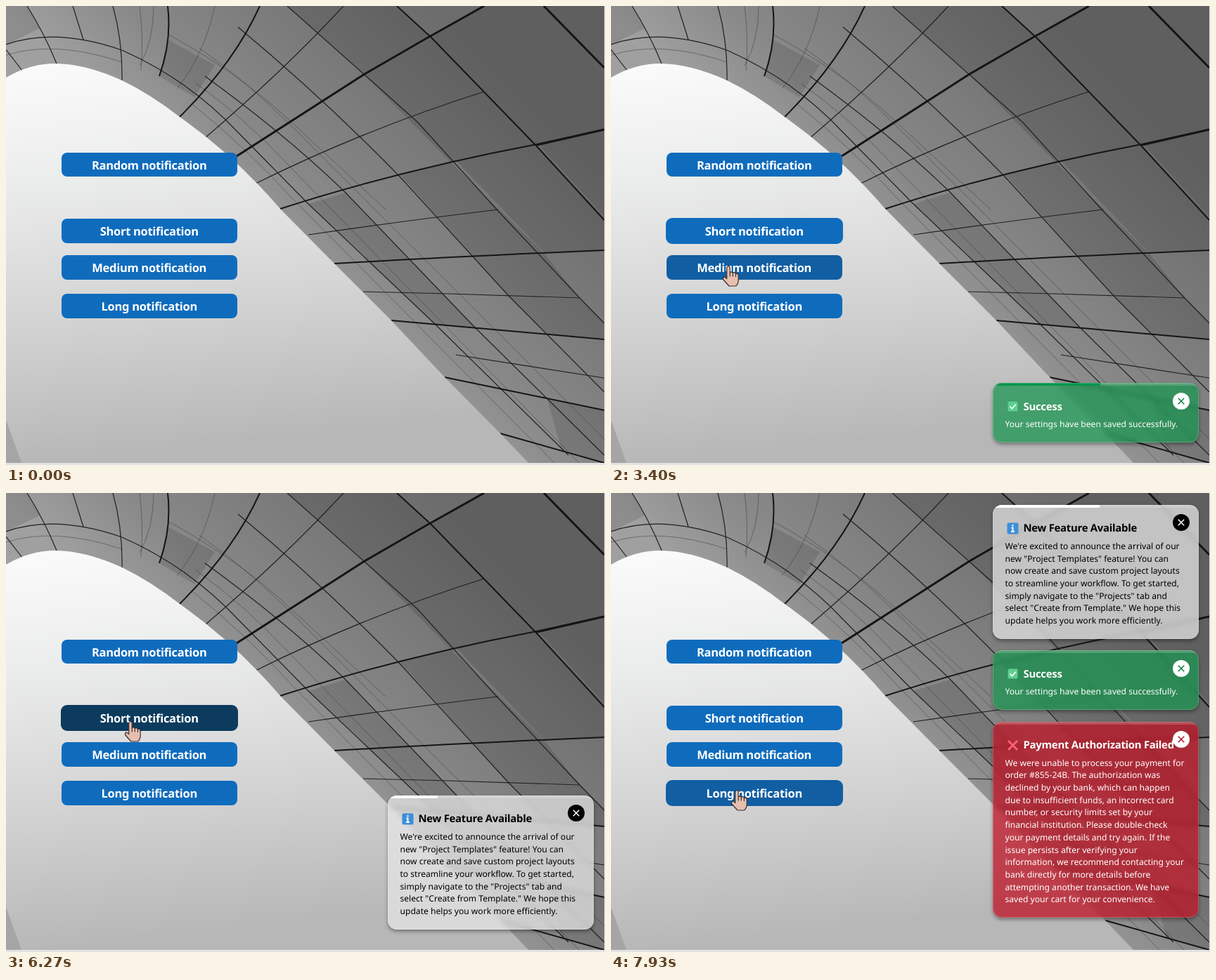
These frames come from a looping animation (852x654 px, 8000 ms). An HTML page:

```html
<!DOCTYPE html>
<html lang="en">
<head>
<meta charset="utf-8">
<title>Notifications</title>
<style>
  html, body { margin: 0; width: 100%; height: 100%; overflow: hidden; }
  #stage {
    position: relative; width: 852px; height: 654px; overflow: hidden; background: #ddd;
    font-family: "Noto Sans", "Open Sans", sans-serif; text-rendering: geometricPrecision;
  }
  #stage > * { position: absolute; left: 0; top: 0; }
  #stage > .button {
    --fill: #0f6cbd;
    left: 78.5px; width: 250.5px; height: 34.4px; line-height: 35px; border-radius: 8px;
    background: var(--fill); color: #fff; text-align: center;
    font-size: 16.5px; font-weight: 600; letter-spacing: -.018em;
  }
  #stage > .hover { --fill: #115ea3; }
  #stage > .pressed { --fill: #0c3b5e; }
  #stage > .focus { box-shadow: 0 0 0 1px var(--fill); }
  #stage > .toast {
    left: 543px; width: 293px; border-radius: 13px; overflow: hidden; color: #fff;
    backdrop-filter: blur(3px); box-shadow: 0 3px 5px rgba(0, 0, 0, .35);
  }
  .toast::after {
    content: ""; position: absolute; inset: 0; border-radius: 13px;
    border: 1px solid rgba(255, 255, 255, .2);
  }
  .toast > * { position: absolute; }
  .success { background: rgba(27, 150, 80, .75); --bar: #05954a; --mark: #0b8043; }
  .error { background: rgba(190, 20, 36, .75); --bar: #b0122a; --mark: #b0122a; }
  #stage > .info { background: rgba(228, 228, 228, .75); color: #000; --bar: #fff; }
  .track { left: 0; top: 0; width: 100%; height: 4px; background: rgba(255, 255, 255, .18); }
  .bar { height: 4px; background: var(--bar); }
  .icon { left: 20px; top: 25px; }
  .title {
    left: 43.5px; top: 23.5px; line-height: 20px; white-space: nowrap;
    font-size: 14.9px; font-weight: 600; letter-spacing: -.018em;
  }
  .text { left: 17.5px; top: 50px; line-height: 17.68px; font-size: 12.1px; white-space: pre; }
  .close { left: 256px; top: 13.5px; }
</style>
</head>
<body>
<div id="stage">
  <svg width="852" height="654" fill="none">
    <defs>
      <linearGradient id="sky" x1="0" y1="82" x2="60" y2="651" gradientUnits="userSpaceOnUse">
        <stop offset="0" stop-color="#fbfbfb"/><stop offset=".3" stop-color="#ebecec"/>
        <stop offset=".65" stop-color="#d3d3d3"/><stop offset="1" stop-color="#b7b7b7"/>
      </linearGradient>
      <linearGradient id="wall" x1="380" y1="390" x2="690" y2="80" gradientUnits="userSpaceOnUse">
        <stop offset="0" stop-color="#a0a0a0"/><stop offset=".3" stop-color="#888"/>
        <stop offset=".7" stop-color="#777"/><stop offset="1" stop-color="#6c6c6c"/>
      </linearGradient>
    </defs>
    <path fill="url(#wall)" d="M0 0H851V651H0Z"/>
    <g fill="#000" fill-opacity=".12">
      <path d="M605 45L680 0H765L851 88V176L755 198Z"/>
      <path d="M765 0H851V88Z"/>
      <path d="M640 220L755 198L851 302V349L765 351Z"/>
      <path d="M510 98L605 45L678 122L755 198L632 222Z"/>
      <path d="M400 0H556L603 44L510 97Z"/>
      <path d="M757 197L851 177V300Z"/>
      <path d="M560 240L632 222L765 352L816 416L715 413Z"/>
      <path d="M715 414L816 417L851 452V474L770 467Z"/>
      <path d="M0 0H30L48 32L0 55Z"/>
      <path d="M230 48L297 84L268 130L218 100Z"/>
      <path d="M430 282L483 266L667 458L610 453Z"/>
      <path d="M770 560L851 576V650L790 632Z"/>
    </g>
    <g stroke="#2c2c2c" stroke-opacity=".55" stroke-width=".8">
      <path d="M190 0Q196 45 192 92M210 0Q210 50 190 85M297 0Q282 70 243 118M0 70Q70 48 165 80"/>
      <path d="M275 60Q340 105 410 175L851 617M270 110Q340 160 400 225L815 651"/>
      <path d="M265 140Q340 200 410 277L780 651M230 40Q330 95 400 160L540 290"/>
    </g>
    <g stroke="#202020" stroke-width="1.2">
      <path d="M0 55Q70 30 165 63Q260 105 330 180L430 282L610 453L800 640M283 188Q395 92 480 0"/>
      <path d="M355 253Q510 176 680 122M430 326Q560 307 700 290M508 407L630 410L816 416"/>
      <path d="M640 497L851 530M95 0L110 48M0 62L23 92M72 82Q55 40 30 0M165 106Q166 50 152 0"/>
      <path d="M283 100Q400 185 483 266L667 458L851 640M330 30Q450 130 560 243L715 413L851 550"/>
      <path d="M400 0L510 98L585 165L698 290L816 416L851 452"/>
    </g>
    <g stroke="#151515" stroke-width="2">
      <path d="M467 367Q640 357 851 348M548 448Q668 459 851 475M624 529L851 576M703 609L851 651"/>
      <path d="M390 289Q560 234 755 197L851 176M247 158Q325 80 361 0M218 100Q236 50 230 0"/>
      <path d="M556 0L605 45L755 200L851 305"/>
    </g>
    <path stroke="#141414" stroke-width="3" d="M328 214L510 97L600 45L680 0M755 198L851 176M765 0L851 88"/>
    <path fill="url(#sky)" d="M0 102Q34 82 70 82Q112 82 165 106Q206 126 247 158Q325 213 390 289L467 367L548 448L624 529L703 609L743 651H0Z"/>
    <path fill="#a5a5a5" d="M0 590L22 651H0Z"/>
    <path fill="#e2e2e2" d="M0 651H851V0H852V654H0Z"/>
  </svg>
</div>
<script>
const LOOP = 8000, ENTER = 600, FLOOR = 622, GAP = 16.5;
const stage = document.getElementById("stage");

const ICONS = {
  success: '<rect x="1.5" y="1.5" width="14" height="14" rx="2" fill="#5fcf8d"/><path d="M4.5 8.5l3 3.2 5.2-6" stroke="#fff" stroke-width="1.7"/>',
  info: '<rect x=".5" y=".5" width="16" height="16" rx="2" fill="#3c8fd9"/><path d="M8.5 3v2.4M6.5 7.5h2v5.5M6 13h5" stroke="#fff" stroke-width="2"/>',
  error: '<path d="M2 2l13 13M15 2L2 15" stroke="#ff5f72" stroke-width="3"/>'
};
const TEXTS = {
  success: ["Success", "Your settings have been saved successfully."],
  info: ["New Feature Available", `We're excited to announce the arrival of our
new "Project Templates" feature! You can
now create and save custom project layouts
to streamline your workflow. To get started,
simply navigate to the "Projects" tab and
select "Create from Template." We hope this
update helps you work more efficiently.`],
  error: ["Payment Authorization Failed", `We were unable to process your payment for
order #855-24B. The authorization was
declined by your bank, which can happen
due to insufficient funds, an incorrect card
number, or security limits set by your
financial institution. Please double-check
your payment details and try again. If the
issue persists after verifying your
information, we recommend contacting your
bank directly for more details before
attempting another transaction. We have
saved your cart for your convenience.`]
};

function add(className, html) {
  const el = document.createElement("div");
  el.className = className;
  el.innerHTML = html;
  stage.append(el);
  return el;
}

const buttons = [["Random", 208.8], ["Short", 303.4], ["Medium", 355.4], ["Long", 410.2]].map(([name, top]) => {
  const el = add("button", name + " notification");
  el.style.top = top + "px";
  return { name, top, el };
});

const clicks = [
  { name: "Short", down: 1930, up: 2200 },
  { name: "Medium", down: 4530, up: 4670 },
  { name: "Short", down: 6270, up: 6470 },
  { name: "Long", down: 7470, up: 7600 }
];

// bar: start time and duration of the countdown; it runs on the oldest toast only
const toasts = [
  { type: "success", start: 1870, show: 2200, end: 5000, bar: [1835, 3000] },
  { type: "info", start: 4490, show: 4670, end: LOOP, bar: [4812, 6000] },
  { type: "success", start: 6570, show: 6570, end: LOOP },
  { type: "error", start: 7669, show: 7669, end: LOOP }
];
for (const toast of toasts) {
  const [title, text] = TEXTS[toast.type];
  const dark = toast.type === "info";
  toast.height = 85 + 17.68 * (text.split("\n").length - 1);
  toast.el = add("toast " + toast.type, `
    <div class="track"><div class="bar"></div></div>
    <svg class="icon" width="17" height="17" fill="none">${ICONS[toast.type]}</svg>
    <div class="title">${title}</div>
    <div class="text">${text}</div>
    <svg class="close" width="24" height="24"><circle cx="12" cy="12" r="12" fill="${dark ? "#000" : "#fff"}"/>
    <path d="M7.8 7.8l8.4 8.4M16.2 7.8l-8.4 8.4" stroke="${dark ? "#fff" : "var(--mark)"}" stroke-width="1.5"/></svg>`);
  toast.el.style.height = toast.height + "px";
  toast.barEl = toast.el.querySelector(".bar");
}

const cursor = add("cursor", `<svg width="44" height="44" viewBox="-14 -4 44 44" stroke-linejoin="round" style="display:block">
  <path id="arrow" d="M1 1V23L7 16.6L16.5 16.4Z" fill="#f2606c" stroke="#000" stroke-width="2"/>
  <g id="hand" stroke="#3a3030" stroke-width="1.2" fill="#e6bfae">
    <path d="M-2.3 16V2.5Q0 -1.5 2.2 2.5V10Q4.5 7.5 6.3 10.5Q8.8 8.3 10.4 11.5Q13.5 10 14.2 14V21Q14 26 10.5 29H1Q-3 25 -7.5 19.5Q-8 15.5 -5 16.3L-2.3 18.5Z"/>
    <path d="M2.2 10V15.5M6.3 10.5V15.5M10.4 11.5V16" fill="none"/>
  </g></svg>`);
const arrow = document.getElementById("arrow"), hand = document.getElementById("hand");

// time, x, y of the pointer
const path = [
  [870, 175, 592], [1470, 156, 339], [1670, 152, 322], [2550, 152, 322], [3000, 167, 370],
  [5850, 167, 370], [6200, 177, 325], [6650, 177, 325], [6870, 189, 357], [7260, 181, 420],
  [7400, 179, 423], [LOOP, 179, 423]
];
const stalls = [[2000, 2200], [4530, 4670], [4670, 5000], [6270, 6470]];

const clamp = v => Math.min(1, Math.max(0, v));
const smooth = p => p * p * (3 - 2 * p);
const backOut = p => 1 + 2.7 * (p - 1) ** 3 + 1.7 * (p - 1) ** 2;

function pointerAt(t) {
  const i = Math.max(1, path.findIndex(k => k[0] > t));
  const [t0, x0, y0] = path[i - 1], [t1, x1, y1] = path[i];
  const p = smooth(clamp((t - t0) / (t1 - t0)));
  return [x0 + (x1 - x0) * p, y0 + (y1 - y0) * p];
}

function drawPointer(t) {
  const visible = t >= path[0][0];
  const [x, y] = pointerAt(t);
  const over = visible && buttons.find(b => y > b.top + 2 && y < b.top + 34);
  const last = clicks.filter(c => t >= c.down).pop();
  for (const b of buttons) {
    const focus = !!last && last.name === b.name;
    b.el.classList.toggle("hover", over === b);
    b.el.classList.toggle("focus", focus);
    b.el.classList.toggle("pressed", focus && t < last.up);
  }
  cursor.style.visibility = visible ? "visible" : "hidden";
  cursor.style.transform = `translate(${x - 14}px, ${y - 4}px)`;
  arrow.style.display = over ? "none" : "";
  hand.style.display = over ? "" : "none";
}

function drawToasts(t) {
  const shown = toasts.filter(n => t >= n.show && t < n.end);
  let bottom = FLOOR;
  for (const n of shown) bottom += (n.height + GAP) * (1 - backOut(clamp((t - n.start) / ENTER)));
  for (const n of [...toasts].reverse()) {
    const on = shown.includes(n);
    n.el.style.display = on ? "" : "none";
    if (!on) continue;
    n.el.style.top = bottom - n.height + "px";
    bottom -= n.height + GAP;
    n.barEl.style.width = (n.bar ? clamp((t - n.bar[0]) / n.bar[1]) * 100 : 0) + "%";
  }
}

function frame() {
  let t = performance.now() % LOOP;
  const stall = stalls.find(([from, to]) => t >= from && t < to);
  if (stall) t = stall[0];
  drawPointer(t);
  drawToasts(t);
  requestAnimationFrame(frame);
}
frame();
</script>
</body>
</html>
```
